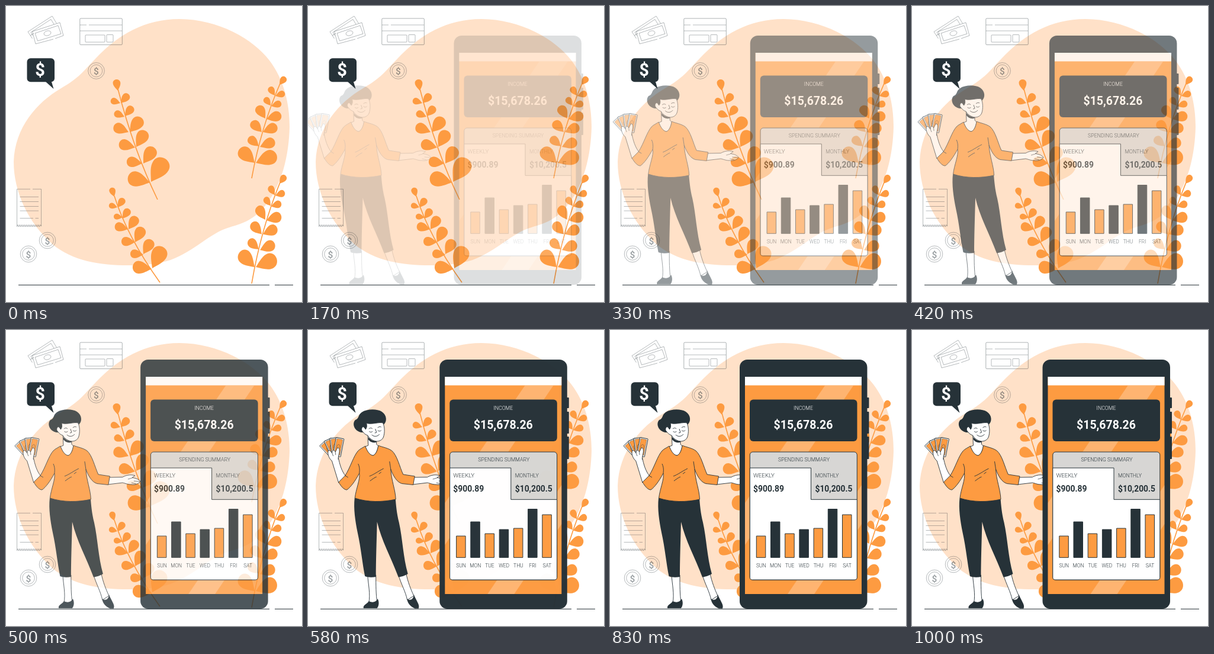
Animation, 500 px wide and 500 px high, one loop 1.04 s. Source, as an HTML page with a canvas:

```html
<!DOCTYPE html>
<html lang="en">
<head>
<meta charset="utf-8">
<title>Spending summary</title>
<style>
  html, body { margin: 0; width: 100%; height: 100%; overflow: hidden; background: #fff; }
  canvas { display: block; width: 500px; height: 500px; }
</style>
</head>
<body>
<canvas id="stage"></canvas>
<script>
const SIZE = 500, LOOP = 1040, TICK = 1000 / 24;
const DARK = '#263238', ORANGE = '#fd9b41', PEACH = '#ffe1c8', GREY = '#d7d6d4';
const FAINT = 'rgba(38,50,56,.48)';
const dpr = window.devicePixelRatio || 1;

function sized(canvas) {
  canvas.width = canvas.height = SIZE * dpr;
  return canvas.getContext('2d');
}
const stage = sized(document.getElementById('stage'));
const layer = sized(document.createElement('canvas'));

// ---- helpers ----
function shape(g, d, fill, stroke, width = 1) {
  const p = new Path2D(d);
  if (fill) { g.fillStyle = fill; g.fill(p); }
  if (stroke) { g.strokeStyle = stroke; g.lineWidth = width; g.stroke(p); }
}

function box(g, x, y, w, h, r, fill, stroke, width = 1) {
  g.beginPath();
  g.roundRect(x, y, w, h, r);
  if (fill) { g.fillStyle = fill; g.fill(); }
  if (stroke) { g.strokeStyle = stroke; g.lineWidth = width; g.stroke(); }
}

function ring(g, x, y, r, stroke, width) {
  g.beginPath();
  g.arc(x, y, r, 0, Math.PI * 2);
  g.strokeStyle = stroke;
  g.lineWidth = width;
  g.stroke();
}

// ---- text, set in the narrowest installed face ----
const fontOf = (face, weight, size) => `${weight} extra-condensed ${size}px "${face}", sans-serif`;

function widthOf(face, weight, size, text) {
  stage.font = fontOf(face, weight, size);
  return stage.measureText(text).width;
}

const FACE = ['Roboto', 'Open Sans', 'Noto Sans', 'Lato', 'Liberation Sans']
  .map(name => [widthOf(name, 700, 50, '$15,678.26 MONTHLY'), name])
  .sort((a, b) => a[0] - b[0])[0][1];

// The wanted size, or the largest one that stays inside room.
function fit(text, size, weight, room) {
  return size * Math.min(1, room / widthOf(FACE, weight, size, text));
}

// Text centred on height y.
function label(g, text, x, y, size, weight, color, align = 'center') {
  g.font = fontOf(FACE, weight, size);
  g.textAlign = align;
  g.fillStyle = color;
  g.fillText(text, x, y + size * 0.355);
}

function fitted(g, text, x, y, size, weight, room, color, align) {
  label(g, text, x, y, fit(text, size, weight, room), weight, color, align);
}

// ---- plants: each leaf is base x, base y, tip x, tip y ----
const plantA = {
  stem: 'M256 327Q215.500 243.500 189 140',
  leaves: [
    189,143,186,124, 193,164,177,159, 194,164,207,149, 200,187,183,180, 201,186,214,170,
    207,213,182,203, 209,213,229,189, 218,239,191,232, 220,238,236,211, 230,266,204,262,
    232,266,250,239, 243,298,206,289, 245,297,269,258]
};
const plantB = {
  stem: 'M260 467Q204.500 389.500 183 321',
  leaves: [
    183,322,178,307, 188,340,174,336, 189,340,199,325, 197,357,182,355, 197,359,208,343,
    206,377,184,371, 207,377,221,356, 218,399,195,397, 218,399,231,374, 232,420,210,418,
    232,419,246,395, 246,444,214,440, 247,443,265,407]
};
const plantC = {
  stem: 'M415 291Q431 204 463 131',
  leaves: [
    462,133,472,120, 455,152,471,147, 454,151,445,137, 448,169,465,164, 447,168,437,155,
    440,191,465,184, 438,190,425,169, 434,213,458,203, 432,213,415,195, 429,238,454,228,
    427,237,410,222, 422,265,457,251, 420,265,395,241]
};
const leafPath = new Path2D('M0 0C.25-.16 .45-.34 .7-.33C.9-.32 1-.15 1 0C1 .15 .9 .32 .7 .33C.45 .34 .25 .16 0 0Z');

function plant(g, { stem, leaves }) {
  shape(g, stem, null, ORANGE, 1.6);
  g.fillStyle = ORANGE;
  for (let i = 0; i < leaves.length; i += 4) {
    const [x, y, tx, ty] = leaves.slice(i, i + 4);
    const len = Math.hypot(tx - x, ty - y);
    g.save();
    g.translate(x, y);
    g.rotate(Math.atan2(ty - y, tx - x));
    g.scale(len, len);
    g.fill(leafPath);
    g.restore();
  }
}

// ---- still scenery ----
function coin(g, x, y) {
  ring(g, x, y, 13.8, FAINT, 0.7);
  ring(g, x, y, 10.3, FAINT, 0.7);
  label(g, '$', x, y, 15.5, 500, FAINT);
}

function icons(g) {
  const thin = d => shape(g, d, null, FAINT, 0.7);
  // banknotes
  thin('M44.500 55L37 43.500L78 17L85.500 29.500M45 50L42 44.500L76 22.500L81 31M41 50L47 46');
  thin('M80 56L50 64L44.500 43L91 28L97 50L83 55M53.500 59L49 46L88 33L93 47Z');
  g.beginPath();
  g.ellipse(70, 46, 6, 4, -0.28, 0, Math.PI * 2);
  g.stroke();
  // bank card
  box(g, 124.800, 21, 71.500, 44.500, 1.500, null, FAINT, 0.8);
  thin('M125 32H136M140 32H196M125 42H196');
  box(g, 134, 49, 33, 12, 1, null, FAINT, 0.7);
  box(g, 170, 48.500, 11, 12.500, 1, null, FAINT, 0.7);
  // receipt
  let zig = 'M18.500 372V309.300H41M45 309.300H59.500V372';
  for (let i = 1; i <= 28; i++) zig += `L${59.5 - i * 41 / 28} ${i % 2 ? 369.5 : 373}`;
  thin(zig);
  for (const y of [322.5, 330.5, 338.5, 346]) thin(`M23.500 ${y}H55`);
  thin('M23.500 358.500H46M49.500 358.500H55');
  coin(g, 152.500, 109.500);
  coin(g, 70, 396);
  coin(g, 38, 419);
}

function scenery(g) {
  g.fillStyle = '#fff';
  g.fillRect(0, 0, SIZE, SIZE);
  shape(g, `M293 22C358 22 418 56 445 92C470 125 479 165 479 204C478 250 467 305 434 342
    C412 366 392 369 374 375C345 384 318 414 278 429C255 436 232 438 206 438
    C160 438 112 431 78 402C38 366 13 315 13 263C15 205 52 163 93 139
    C125 120 128 113 152 88C190 48 235 22 293 22Z`, PEACH);
  icons(g);
  shape(g, 'M21 471.300H445M454 471.300H485', null, '#4f585c', 1.2);
  plant(g, plantA);
  plant(g, plantB);
  plant(g, plantC);
  g.save();
  g.translate(0, 158);
  g.scale(1, 1.068);
  plant(g, plantC);
  g.restore();
  box(g, 35.500, 88.300, 46.500, 40, 6, DARK);
  shape(g, 'M66 127L80.500 140L76 125Z', DARK);
  label(g, '$', 57.500, 107.500, 29, 700, '#fff');
}

// ---- woman ----
function woman(g) {
  const skin = d => shape(g, d, '#fff', DARK, 0.9);
  const line = (d, w = 0.9) => shape(g, d, null, DARK, w);

  // legs and shoes
  skin('M104 414C105 430 109 446 106 461L120 460C118 446 118 432 118 414Z');
  skin('M156 414C161 430 168 442 171 456L182 449C177 438 172 426 169 411Z');
  shape(g, 'M106 458C103 463 96 464 97 470H120C123 466 124 460 121 454C118 460 112 461 106 458Z', DARK);
  shape(g, 'M170.500 454C171 461 177 468 184 470.500H190C193 464 185 456 182 446.500C182 455 176 458 170.500 454Z', DARK);
  shape(g, `M82 284C80 302 83 322 87 342C93 369 95 394 99.500 416C105 418 111 418 118 417
    C118 390 119 362 120 324C127 355 144 385 156 417.500C161 417 167 415 172 412
    C164 384 163 352 157 325C153 309 152 296 151 284Z`, DARK);

  // far arm
  skin(`M180 249L205 248.500C211 245 219 243.500 226 246L221 249.500C228 250 234 253 235 256
    C232 260 226 262 220 261C213 261 210 259 205 258L180 261Z`);
  line('M221 250L214 252M234 256L224 255M228 260L220 258', 0.7);

  // near forearm, neck
  skin('M43 219L55 258L67 247C60 238 57 228 54 213Z');
  skin('M104 172L105 195L100 197C103 206 108 212 113 212C118 211 121 202 122 196L119 193V182Z');
  shape(g, 'M105 181C109 185 113 188 119 187.500V189.500C113 191.500 108 189 105 185Z', DARK);

  // shirt
  shape(g, `M100 196C96 199 92 200 88 204C80 213 75 232 66 246L55 257C59 264 64 270 69 270
    C76 265 83 255 90 242C92 252 84 269 82.500 284C104 291 129 291 151.500 286
    C151 270 144 254 143 235C147 246 153 257 162 259.500L181 261.500L183.500 247
    L164 244C158 231 154 212 145 204C138 199 129 198 122 195C121 204 117 211 113 212
    C107 211 103 204 100 196Z`, ORANGE, DARK, 0.9);
  line('M90 242C91 235 90 230 88 226M143 235L141 222M107 247C115 244 121 239 131 234M108 255C112 252 116 249 119 248M123 243L127 240M66 246L71 249');

  // head
  shape(g, `M97 173C84 174 76 160 83 152C90 150 87 144 94 139C103 133 120 133 128 138
    C137 144 137 155 131 160L128 169Z`, DARK);
  skin(`M96 172C93 170 93 164 97 163.500C99 165 100 167 100.500 168C103 165 103 161 102 157.500
    C112 160 123 155 130 157C133 164 133 173 131 180C129 186 124 188 119 188
    C112 187 107 183 104 178C101 177 98 175 96 172Z`);
  line('M106 167C108 165 111 165 112 167M106.500 171C108 173 111 173 112.500 171M121 165C123 163 126 163 127 164M121 169.500C123 171.500 126 171 127 169.500');
  line('M117 167L119 173L116 174M111 177C115 181 121 180 124 176');

  // fan of notes and the fist holding it
  for (const turn of [-43, -25, -7, 11]) {
    g.save();
    g.translate(51, 216);
    g.rotate(turn * Math.PI / 180);
    box(g, -6.800, -34, 13.600, 31, 0.5, '#fff', DARK, 0.9);
    box(g, -5, -32.200, 10, 27, 0.5, ORANGE, DARK, 0.4);
    g.beginPath();
    g.ellipse(0, -19, 2.6, 4, 0, 0, Math.PI * 2);
    g.stroke();
    g.restore();
  }
  skin(`M43.500 221C38 216 36 209 37.500 204C41 202 42 206 44 208C44 203 47 201 49.500 206
    L53 199C56 198 57 203 56 208C55 213 54 216 54.500 219`);
  line('M44 208L46 213M49.500 206L50 211', 0.7);
}

// ---- phone ----
const days = [['SUN', 348], ['MON', 324], ['TUE', 344], ['WED', 337],
              ['THU', 335], ['FRI', 302.5], ['SAT', 312]];
const daySize = fit('MON', 12.5, 300, 19);

function phone(g) {
  for (const [y, h] of [[114, 18], [138, 37], [180, 38]]) box(g, 432, y, 5.500, h, 1, DARK);
  box(g, 219, 50, 215.500, 421, 13, DARK);
  g.fillStyle = ORANGE;
  g.fillRect(228, 79, 197, 367);
  const gloss = 'rgba(255,255,255,.25)';
  shape(g, 'M363 94H411L228 363V292Z', gloss);
  shape(g, 'M300 446H345L425 328V262Z', gloss);
  g.fillStyle = '#fff';
  g.fillRect(228, 79, 197, 14.500);

  box(g, 236, 117.500, 181.500, 70.500, 6, DARK);
  fitted(g, 'INCOME', 326.500, 131.500, 14, 300, 33, '#fff');
  fitted(g, '$15,678.26', 326.500, 160, 28, 700, 100, '#fff');

  box(g, 236.300, 206, 181, 216, 5, GREY, DARK);
  shape(g, 'M236.300 233H339.500V286.300H417.300V418Q417.300 422 413 422H240.500Q236.300 422 236.300 418Z', '#fff', DARK);
  fitted(g, 'SPENDING SUMMARY', 327.500, 219, 14, 300, 87, DARK);
  fitted(g, 'WEEKLY', 242, 246, 14, 300, 36, DARK, 'left');
  fitted(g, '$900.89', 242, 268.500, 20, 700, 52, DARK, 'left');
  fitted(g, 'MONTHLY', 346.500, 246, 14, 300, 40, DARK, 'left');
  fitted(g, '$10,200.5', 346.500, 268.500, 20, 700, 63, DARK, 'left');

  days.forEach(([day, top], i) => {
    const x = 247.300 + i * 24.200;
    box(g, x, top, 15.500, 384.300 - top, 0, i % 2 ? DARK : ORANGE, DARK);
    label(g, day, x + 8, 398, daySize, 300, DARK);
  });
}

// ---- motion ----
function show(draw, dx, alpha) {
  layer.setTransform(1, 0, 0, 1, 0, 0);
  layer.clearRect(0, 0, SIZE * dpr, SIZE * dpr);
  layer.setTransform(dpr, 0, 0, dpr, dx * dpr, 0);
  draw(layer);
  stage.globalAlpha = alpha;
  stage.drawImage(layer.canvas, 0, 0, SIZE, SIZE);
  stage.globalAlpha = 1;
}

// Both figures fade in while closing on each other, then sway.
function render(step) {
  stage.setTransform(dpr, 0, 0, dpr, 0, 0);
  scenery(stage);
  const enter = Math.min(1, (step - 2.2) / 12);
  if (enter <= 0) return;
  const sway = step > 14 ? 2.8 * Math.sin(Math.PI * (step - 14) / 11.8) : 0;
  const dx = 29 * (1 - enter) + 2.8 - sway;
  show(woman, -dx, enter);
  show(phone, dx, enter);
}

let start = null, last = -1;
function frame(now) {
  if (start === null) start = now;
  const step = Math.floor(((now - start) % LOOP + 4) / TICK);
  if (step !== last) render(last = step);
  requestAnimationFrame(frame);
}
render(0);
requestAnimationFrame(frame);
</script>
</body>
</html>
```
